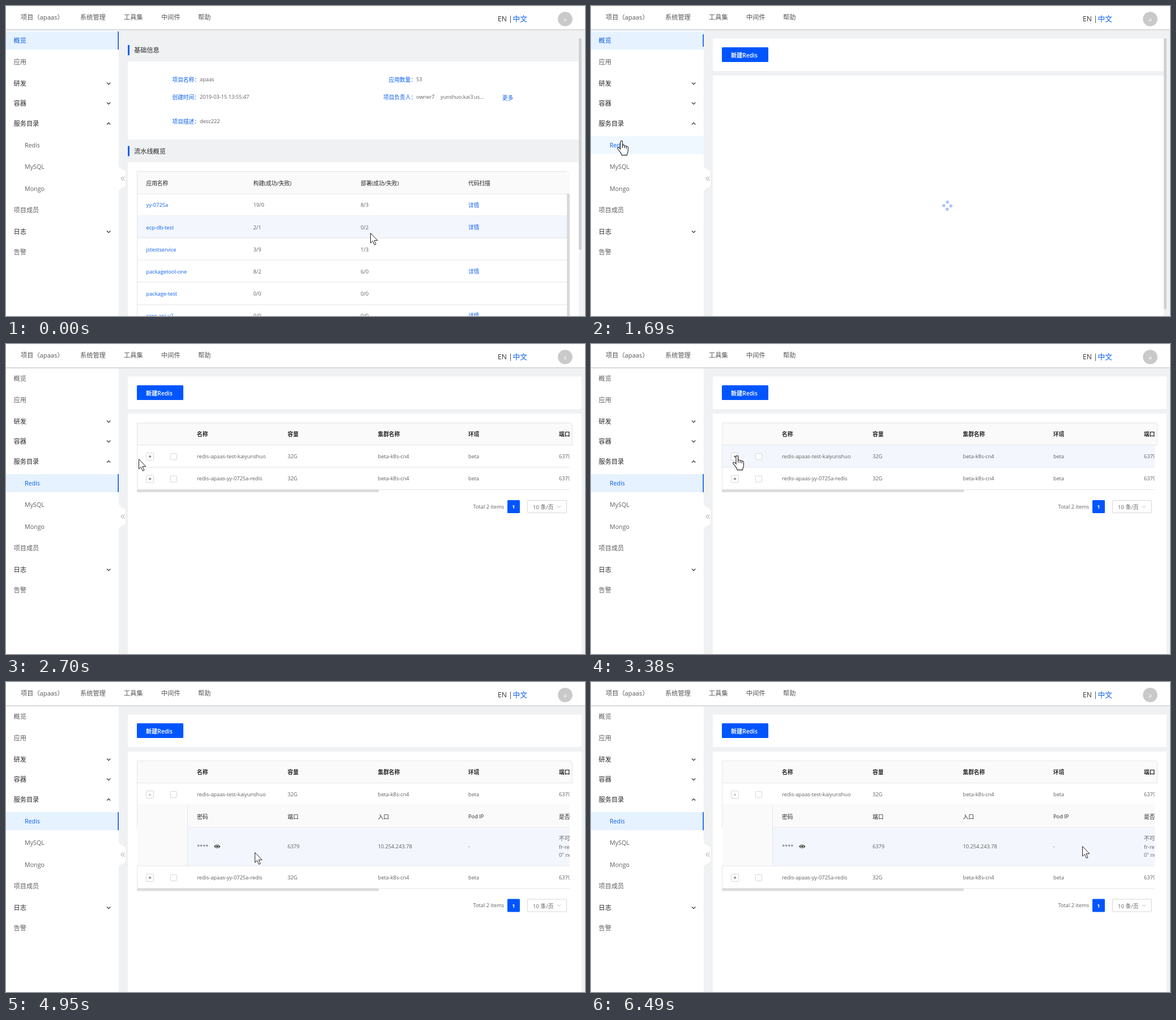
An HTML page that plays this animation: 1022 px wide and 548 px high, repeating every 6.87 s.

```html
<!DOCTYPE html>
<html lang="zh-CN">
<head>
<meta charset="utf-8">
<title>Redis</title>
<style>
  html, body { margin: 0; width: 100%; height: 100%; overflow: hidden; background: #f0f1f3; }
  svg { display: block; width: 100vw; height: 100vh; }
  text { font-family: "Open Sans", "Noto Sans CJK SC", "Noto Sans CJK", sans-serif; white-space: pre; }
</style>
</head>
<body>
<svg id="stage" viewBox="0 0 1022 548"></svg>
<script>
const BLUE = '#0a5fef', DARK = '#262626', GREY = '#606060', LINE = '#e4e5e7', HEAD = '#fafafa';
const LOOP = 6870;

// ---- markup helpers ----
const rect = (x, y, w, h, fill, extra = '') =>
  `<rect x="${x}" y="${y}" width="${w}" height="${h}" fill="${fill}" ${extra}/>`;
const path = (d, stroke, width = 1, extra = 'fill="none"') =>
  `<path d="${d}" stroke="${stroke}" stroke-width="${width}" ${extra}/>`;
const text = (x, y, str, fill = GREY, size = 9.7, weight = 400) => {
  const px = /[\u3000-\uffff]/.test(str) ? size : size * .955;
  return `<text x="${x}" y="${y + px * .37}" font-size="${px}" font-weight="${weight}" fill="${fill}">${str}</text>`;
};
const group = (id, body, extra = '') => `<g id="${id}" ${extra}>${body}</g>`;
const hline = (x, y, w) => rect(x, y, w, 1, LINE);
const hover = (x, y, w, h) => rect(x, y, w, h, '#f3f6fd', 'class="hover"');
const cells = (xs, y, labels, fill, weight) =>
  labels.map((label, i) => text(xs[i], y, label, fill, 9.7, weight)).join('');

// ---- frame of the page ----
function header() {
  const menu = [[26, '项目（apaas）'], [131, '系统管理'], [208, '工具集'], [274, '中间件'], [339, '帮助']];
  return rect(0, 0, 1022, 41, '#fff') + rect(0, 0, 1022, 1, '#f0fcf6') +
    rect(0, 41, 1022, 1, '#d3d4d6') + rect(0, 42, 1022, 1.5, '#e3e4e6') +
    menu.map(([x, s]) => text(x, 20, s, '#555', 11.2)).join('') +
    text(868, 22, 'EN | ', '#333', 12.8) + text(894.5, 22, '中文', BLUE, 12.8) +
    '<circle cx="987" cy="23" r="12.8" fill="#c9c9c9"/>' + text(984.3, 23.5, 'a', '#fff', 9.7);
}

const menuItems = [
  ['概览', 61], ['应用', 99], ['研发', 137, 1], ['容器', 172, 1], ['服务目录', 208, -1], ['Redis', 246],
  ['MySQL', 284.5], ['Mongo', 323], ['项目成员', 361], ['日志', 399, 1], ['告警', 435]
];
function sidebar() {
  const tab = 'M199 282C200 290 211 288 211 295V315C211 322 200 320 199 329Z';
  const items = menuItems.map(([label, y, dir]) => {
    const sub = /^[A-Z]/.test(label);
    return `<g class="item">${text(sub ? 33 : 13.5, y, label, dir ? DARK : GREY, 11.2)}</g>` +
      (dir ? path(`M178 ${y - 1.5 * dir}l3.2 ${3 * dir} 3.2 ${-3 * dir}`, '#444', 1.3) : '');
  });
  return rect(0, 43, 199, 505, '#fff') + path(tab, 'none', 0, 'fill="#fff"') +
    path('M206 301.5l-3 3.7 3 3.7M209.5 301.5l-3 3.7 3 3.7', '#999') +
    rect(0, 45, 199, 32, '#e6f2ff', 'id="homeBg"') + rect(197.3, 45, 1.7, 32, BLUE, 'id="homeBar"') +
    rect(0, 230, 199, 32, '#e6f2ff', 'id="redisBg"') + rect(197.3, 230, 1.7, 32, BLUE, 'id="redisBar"') +
    items.join('');
}

// ---- views ----
function homeView() {
  const cols = [247.5, 436.5, 626, 816], detail = '详情';
  const rows = [
    ['yy-0725a', '19/0', '8/3', detail], ['ecp-db-test', '2/1', '0/2', detail],
    ['jstestservice', '3/9', '1/3', ''], ['packagetool-one', '8/2', '6/0', detail],
    ['package-test', '0/0', '0/0', ''], ['core-api-v2', '0/0', '0/0', detail]
  ];
  const title = (y, s) => rect(215, y - 9, 3, 18, BLUE) + text(226, y, s, DARK, 11.2);
  const field = (x, y, label, valueX, value) => text(x, y, label, BLUE) + text(valueX, y, value);
  return title(78, '基础信息') + rect(215, 98, 796, 138, '#fff') +
    field(293.5, 130, '项目名称：', 342, 'apaas') + field(675.5, 130, '应用数量：', 724, '53') +
    field(293.5, 161, '创建时间：', 342, '2019-03-15 13:55:47') + field(666, 161, '项目负责人：', 724, 'owner7') +
    text(767, 161, 'yunshuo.kai3') + text(826, 161, 'us...') + text(876, 162, '更多', BLUE) +
    field(293.5, 204, '项目描述：', 342, 'desc222') +
    title(256.5, '流水线概览') + rect(215, 276, 796, 272, '#fff') +
    path('M231.5 332V292.5H990Q995 292.5 995 297V332Z', 'none', 0, `fill="${HEAD}"`) +
    path('M231.5 548V292.5H990', LINE) + hline(231, 331.5, 764) +
    cells(cols, 313, ['应用名称', '构建(成功/失败)', '部署(成功/失败)', '代码扫描'], DARK, 500) +
    rows.map((row, i) => {
      const y = 332 + i * 39.15;
      return hover(232, y, 758, 39) + hline(231, Math.round(y + 39) - .5, 760) +
        row.map((s, c) => text(cols[c], y + 20, s, c % 3 ? GREY : BLUE)).join('');
    }).join('') +
    rect(990, 332, 5, 216, '#d9d9d9') + rect(1011, 57, 5, 374, '#d0d1d3', 'rx="2.5"');
}

const newButton = rect(215, 57.5, 796, 57.5, '#fff') + rect(231, 73, 82, 26, '#0055ff', 'rx="1.5"') +
  text(247, 87, '新建Redis', '#fff', 10.2, 600);

function loadingView() {
  const dots = [0, 1, 2, 3].map(i => {
    const a = i * Math.PI / 2 + .05;
    return `<circle cx="${6.2 * Math.cos(a)}" cy="${6.2 * Math.sin(a)}" r="2.8" fill="#a9c6fa"/>`;
  }).join('');
  return newButton + rect(215, 123, 796, 425, '#fff') + rect(1011, 57, 5, 479, '#d0d1d3', 'rx="2.5"') +
    group('spinner', dots);
}

function listView() {
  const cols = [337, 497, 656.5, 816, 976];
  const box = (x, y, w, h) => rect(x + .5, y + .5, w - 1, h - 1, '#fff', 'stroke="#d6d6d6" rx="1"');
  const row = (y, name, sign) => box(247, y - 6.5, 14, 14) + sign + box(290, y - 5.5, 12, 12) +
    cells(cols, y, [name, '32G', 'beta-k8s-cn4', 'beta', '6379']) + hline(231, y + 19, 764);
  const plus = y => path(`M251.8 ${y + .5}h4.6m-2.3-2.3v4.6`, '#555');
  const detail = rect(232, 218, 88, 107, HEAD) + rect(320, 218, 675, 39, HEAD) + hline(320, 256.5, 675) +
    hover(320, 257.5, 675, 67) + rect(320, 218, 1, 107, LINE) + hline(231, 324.5, 764) +
    cells(cols, 238, ['密码', '端口', '入口', 'Pod IP', '是否可用'], DARK, 500) +
    cells(cols, 291, ['****', '6379', '10.254.243.78', '-']) +
    ['不可用', 'fr-redis', '0" not'].map((s, i) => text(976, 276.5 + 14.7 * i, s)).join('') +
    path('M367 290.7Q372.7 283.5 378.5 290.7 372.7 298 367 290.7Z', 'none', 0, 'fill="#444"') +
    '<circle cx="372.7" cy="290.7" r="2.5" fill="#444" stroke="#fff"/>';
  const footer = rect(231, 257, 427, 5, '#dcdcdc', 'rx="1.5"') + text(824.5, 287.5, 'Total 2 items') +
    rect(885, 276, 22, 23, '#0055ff', 'rx="1.5"') + text(893.2, 288, '1', '#fff', 9.7, 700) +
    box(920, 276, 70, 23) + text(930, 288.5, '10 条/页') + path('M973 286l3 3.2 3-3.2', '#bbb');
  return newButton + rect(1010, 57.5, 6, 57.5, '#fff') + rect(215, 123, 801, 425, '#fff') +
    path('M231.5 178V139.5H995Q999.5 139.5 999.5 144V178Z', 'none', 0, `fill="${HEAD}"`) +
    path('M231.5 257V139.5H995Q999.5 139.5 999.5 144V178', LINE) + hline(231, 178, 769) +
    group('clipped',
      cells(cols, 159.5, ['名称', '容量', '集群名称', '环境', '端口'], DARK, 600) +
      hover(232, 179, 763, 38.5) +
      row(198.5, 'redis-apaas-test-kaiyunshuo', group('plus', plus(198.5)) + group('minus', path('M252.5 199.5h3', '#555'))) +
      group('detail', detail) +
      group('rest', row(238, 'redis-apaas-yy-0725a-redis', plus(238)) + path('M231.5 218V257', LINE) + footer),
      'clip-path="url(#tableClip)"');
}

const arrow = path('M.5 .5V18L4.3 14.4 7.4 21.4 10 20.2 7 13.4H12.8Z', '#222', 1, 'fill="#fff"');
const hand = path('M-2 15V2.2C-2-.3 1.6-.3 1.6 2.2V9C2.4 7.4 5 7.8 5.2 9.5 6 8.4 8.2 8.8 8.4 10.4 9.4 9.6 11.4 10.4 11.4 12V18' +
  'C11.4 21 9.6 22 9.6 25.6H0C0 22-3 20-7 14.2-8.2 11.6-5 10.6-2 15ZM1.6 9v4M5.2 10v3.4M8.4 11v3', '#222', 1.1, 'fill="#fff"');

const stage = document.getElementById('stage');
stage.innerHTML = '<clipPath id="tableClip"><rect x="231" y="123" width="764" height="425"/></clipPath>' +
  rect(0, 0, 1022, 548, '#f0f1f3') + group('home', homeView()) + group('loading', loadingView()) +
  group('list', listView()) + sidebar() + header() +
  group('ring', '<circle r="14" fill="none" stroke="#222"/><circle r="13" fill="none" stroke="#fff"/>') +
  group('pointer', group('arrow', arrow) + group('hand', hand));

// ---- motion ----
const pointerPath = [
  [0, 643, 401], [166, 643, 401], [900, 80, 247], [980, 57, 239], [1070, 53, 237], [1300, 54, 238],
  [2233, 54, 238], [2386, 85, 249], [2691, 234, 203], [2920, 253, 199], [3000, 256, 198], [3090, 258, 197],
  [3863, 258, 197], [4400, 322, 293], [4550, 346, 288], [4945, 438.5, 301], [5250, 551, 314],
  [5600, 675, 312], [5950, 781, 293], [6200, 840, 281], [6490, 867, 289.5]
];
// The pointer is sampled in bursts: start, end, number of steps.
const steps = [
  [0, 0, 1], [240, 900, 10], [980, 1070, 2], [1300, 1300, 1], [1690, 1920, 4], [2310, 2920, 9],
  [3000, 3090, 2], [3940, 4550, 9], [4640, 5250, 9], [5340, 5950, 9], [6040, 6490, 7]
].flatMap(([from, to, n]) => Array.from({ length: n }, (_, i) => from + (to - from) * i / Math.max(1, n - 1)));

function pointerAt(t) {
  const i = pointerPath.findIndex(p => p[0] > t);
  if (i < 0) return pointerPath[pointerPath.length - 1].slice(1);
  const [a, b] = [pointerPath[i - 1], pointerPath[i]], k = (t - a[0]) / (b[0] - a[0]);
  return [1, 2].map(c => a[c] + (b[c] - a[c]) * k);
}

const el = id => document.getElementById(id);
const show = (id, on) => { el(id).style.display = on ? '' : 'none'; };
const move = (id, x, y, extra = '') => el(id).setAttribute('transform', `translate(${x} ${y}) ${extra}`);
const hovers = [...stage.querySelectorAll('.hover')];
const itemLabels = [...stage.querySelectorAll('.item text')];

function draw(t) {
  const tick = steps.filter(s => s <= t + .5).pop();
  const [x, y] = pointerAt(tick).map(Math.round);
  const onHome = t < 1690, onList = t >= 1920, open = t >= 3640, homeActive = t < 1770;

  show('home', onHome);
  show('loading', !onHome && !onList);
  show('list', onList);
  show('plus', !open);
  show('minus', open);
  show('detail', open);
  move('rest', 0, open ? 107.5 : 0);
  move('spinner', 629, 353, `rotate(${(tick - 1690) * .3})`);

  show('homeBg', homeActive);
  show('homeBar', homeActive);
  el('homeBar').setAttribute('y', onHome ? 45 : 50);
  el('homeBar').setAttribute('height', onHome ? 32 : 22);
  show('redisBg', !onHome);
  el('redisBg').setAttribute('fill', homeActive ? '#f0f8ff' : '#e6f2ff');
  show('redisBar', !homeActive);

  let overItem = false;
  menuItems.forEach(([label, cy, dir], i) => {
    const over = !dir && x < 199 && Math.abs(y - cy) < 16;
    const active = label === (homeActive ? '概览' : 'Redis');
    overItem = overItem || over;
    itemLabels[i].setAttribute('fill', over || active ? BLUE : dir ? DARK : GREY);
  });
  hovers.forEach(h => {
    const b = h.getAttribute.bind(h), dx = x - b('x'), dy = y - b('y');
    h.style.display = dx > 4 && dx < +b('width') && dy >= 0 && dy < +b('height') ? '' : 'none';
  });

  const overSign = onList && x > 246 && x < 262 && y > 191 && y < 206;
  show('hand', overItem || overSign);
  show('arrow', !overItem && !overSign);
  move('pointer', x, y);
  show('ring', (t >= 1450 && t < 1550) || (t >= 3230 && t < 3380));
  move('ring', x - .5, y + .5);
}

const start = performance.now();
function frame() {
  draw((performance.now() - start) % LOOP);
  requestAnimationFrame(frame);
}
frame();
</script>
</body>
</html>
```
